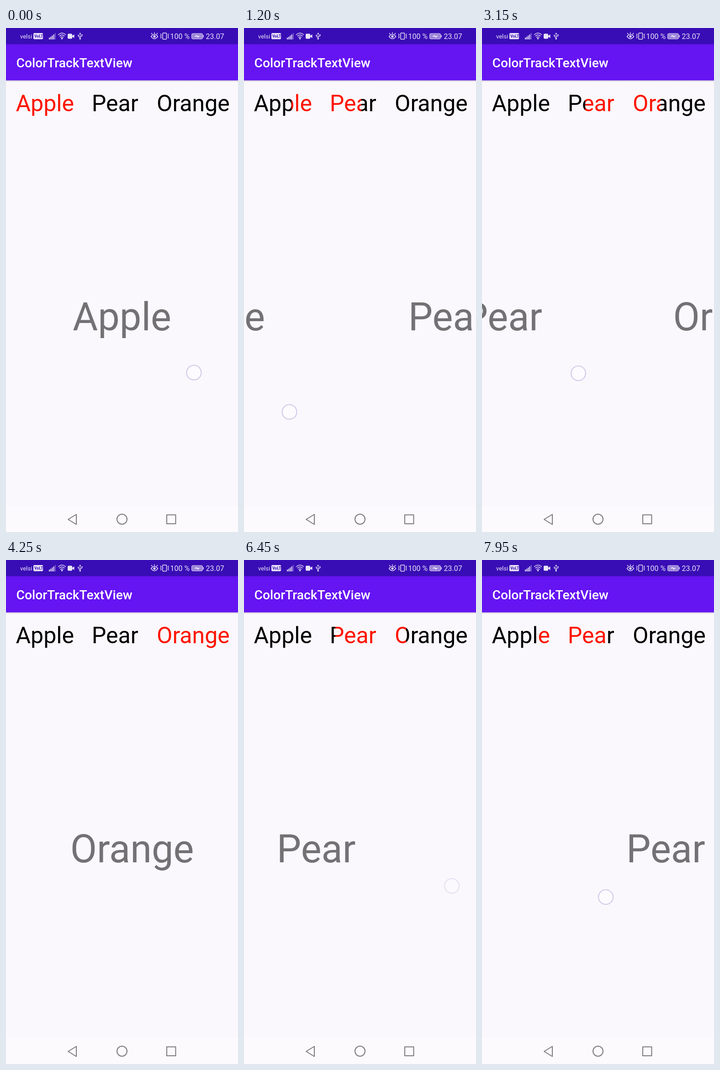
Animation of 508x1102 px, one loop 8 s. Source, as an HTML page:

```html
<!DOCTYPE html>
<html lang="en">
<head>
<meta charset="utf-8">
<title>ColorTrackTextView</title>
<style>
  html, body { margin: 0; width: 100%; height: 100%; overflow: hidden; background: #faf8fc; }
  svg { display: block; width: 508px; height: 1102px; font-family: Roboto, sans-serif; }
  .line { fill: none; stroke-linecap: round; stroke-linejoin: round; }
</style>
</head>
<body>
<svg viewBox="0 0 508 1102">
  <defs>
    <linearGradient id="shadow" x2="0" y2="1">
      <stop stop-color="#000" stop-opacity=".2"/>
      <stop offset="1" stop-color="#000" stop-opacity="0"/>
    </linearGradient>
  </defs>
  <rect width="508" height="1102" fill="#faf8fc"/>
  <rect y="1045" width="508" height="57" fill="#fcfafd"/>
  <rect y="114" width="508" height="4" fill="url(#shadow)"/>
  <rect y="35" width="508" height="79.5" fill="#6514f2"/>
  <rect width="508" height="35.5" fill="#390db5"/>
  <text x="22.5" y="85.5" font-size="28.2" font-weight="500" fill="#fff">ColorTrackTextView</text>

  <g fill="#e9e4f8">
    <text x="31" y="22.5" font-size="13">velsi</text>
    <rect x="60" y="11" width="21" height="13.5" rx="2"/>
    <text x="62" y="21.3" font-size="8.5" font-weight="700" fill="#390db5">VoLTE</text>
    <path d="M94 21h2v4h-2zM97.2 19h2v6h-2zM100.4 16.500h2v8.500h-2zM103.600 14h2v11h-2z"/>
    <path d="M107 11h1.500v14h-1.500z" opacity=".5"/>
    <rect x="135" y="12.500" width="10" height="11" rx="2"/>
    <path d="M145 17l4.500-3v8l-4.500-3z"/>
    <circle cx="122.500" cy="23" r="1.800"/>
    <circle cx="162.300" cy="23.500" r="1.700"/>
    <path d="M160.300 13l2-3 2 3z"/>
    <circle cx="158.500" cy="16" r="1.300"/>
    <path d="M165 14h2.500v2.500h-2.500z"/>
    <circle cx="325" cy="18.500" r="2.600"/>
    <text x="359.500" y="23.500" font-size="16">100 %</text>
    <text x="437.500" y="23.500" font-size="16">23.07</text>
    <rect x="406.500" y="12" width="24" height="12" rx="2.500" fill="#9c85da" stroke="#d5cbef"/>
    <path d="M431.500 15.500h1.500v5h-1.500z"/>
    <path d="M412 18.500l6-3v2h7l-6 3.500v-2.500z" fill="#fff"/>
  </g>
  <g class="line" stroke="#e9e4f8" stroke-width="1.500">
    <path d="M114.500 14.500q8-7 16 0M117 17.500q5.500-4.500 11 0M119.500 20.500q3-2.500 6 0"/>
    <path d="M162.300 12v11M162.300 21l-3.800-2.500v-2M162.300 20l3.800-2v-2" stroke-width="1.200"/>
    <path d="M317.500 18.500q7.500-9 15 0q-7.500 10-15 0zM325 12v-2M320 13.500l-1.500-2M330 13.500l1.500-2"/>
    <rect x="343" y="11" width="8.500" height="13.500" rx="1"/>
    <path d="M338.500 13l1.500 2-1.500 2.500 1.500 2.500-1.500 2M356 13l-1.500 2 1.500 2.500-1.500 2.500 1.500 2" stroke-width="1.300"/>
  </g>

  <g class="line" stroke="#7b797c" stroke-width="2">
    <path d="M136 1074.500L154 1063.500V1085.500z"/>
    <circle cx="254" cy="1074" r="11"/>
    <rect x="352" y="1064.500" width="19.500" height="19.500"/>
  </g>

  <g id="tabs" font-size="50"></g>
  <g id="pages" font-size="84.700" fill="#737174" text-anchor="middle"></g>
  <circle id="touch" r="16" fill="#fdfbfe" stroke="#d0cce9" stroke-width="2.200"/>
</svg>

<script>
const LOOP = 8000, STEP = 50, WIDTH = 508;
const SETTLE = 600, FADE = 130, TAB_LAG = 16;
const WORDS = ['Apple', 'Pear', 'Orange'];
const TAB_EDGES = [0, 169, 311, 511];
const TAB_TEXT_X = [21.5, 187.8, 330];

// Each drag: touch keys [time, x, y, page position], then the page the pager settles on.
const DRAGS = [
  { end: 1, keys: [[0, 411.5, 753.5, 0], [50, 411.5, 753.5, 0], [900, 150, 823, .515],
                   [1200, 99.5, 839.5, .622], [1350, 92, 842, .637]] },
  { end: 2, keys: [[2200, 440, 700, 1], [2290, 418, 705, 1], [3150, 211, 755, 1.41],
                   [3850, 90, 787, 1.65], [4050, 78, 790, 1.67]] },
  { end: 1, keys: [[4950, 95, 800, 2], [5070, 117, 795, 2], [5400, 180, 779.5, 1.88],
                   [5750, 280, 755, 1.69], [6385, 455, 712.5, 1.335]] },
  { end: 0, keys: [[7100, 97, 778, 1], [7190, 119, 772, 1], [7900, 263, 739, .722],
                   [8000, 279, 735, .694]] }
];

const svgNode = (parent, name, attrs, text = '') => {
  const node = document.createElementNS('http://www.w3.org/2000/svg', name);
  for (const key in attrs) node.setAttribute(key, attrs[key]);
  node.textContent = text;
  return parent.appendChild(node);
};
const byId = id => document.getElementById(id);
const touch = byId('touch');

const pages = WORDS.map(word => svgNode(byId('pages'), 'text', { y: 661 }, word));

const tabStops = WORDS.map((word, i) => {
  const gradient = svgNode(byId('tabs'), 'linearGradient', {
    id: 'tint' + i, gradientUnits: 'userSpaceOnUse', x1: TAB_EDGES[i], x2: TAB_EDGES[i + 1]
  });
  const stops = ['#000', '#ff1400', '#ff1400', '#000']
    .map(color => svgNode(gradient, 'stop', { 'stop-color': color }));
  svgNode(byId('tabs'), 'text', { x: TAB_TEXT_X[i], y: 181.5, fill: `url(#tint${i})` }, word);
  return stops;
});

function interpolate(keys, time) {
  const next = keys.findIndex(key => key[0] > time);
  if (next < 0) return keys[keys.length - 1];
  const a = keys[Math.max(0, next - 1)], b = keys[next];
  const u = Math.max(0, (time - a[0]) / (b[0] - a[0]));
  return a.map((value, i) => value + (b[i] - value) * u);
}

function stateAt(time) {
  const drag = DRAGS.filter(d => d.keys[0][0] <= time).pop() || DRAGS[0];
  const [, x, y, held] = interpolate(drag.keys, time);
  const since = Math.max(0, time - drag.keys[drag.keys.length - 1][0]);
  const remaining = (1 - Math.min(1, since / SETTLE)) ** 5;
  return {
    x, y,
    opacity: Math.max(0, 1 - since / FADE),
    position: drag.end + (held - drag.end) * remaining
  };
}

// Red part of a tab as fractions of its width.
function redRange(distance) {
  if (Math.abs(distance) >= 1) return [0, 0];
  return distance >= 0 ? [distance, 1] : [0, 1 + distance];
}

function draw(time) {
  const { x, y, opacity, position } = stateAt(time);
  const tabPosition = stateAt(time - TAB_LAG).position;
  pages.forEach((page, i) => page.setAttribute('x', WIDTH * (i + .5 - position)));
  tabStops.forEach((stops, i) => {
    const [from, to] = redRange(tabPosition - i);
    [from, from, to, to].forEach((offset, k) => stops[k].setAttribute('offset', offset));
  });
  touch.setAttribute('cx', x);
  touch.setAttribute('cy', y);
  touch.setAttribute('opacity', opacity);
}

function frame() {
  const time = performance.now() % LOOP;
  draw(Math.floor(time / STEP) * STEP);
  requestAnimationFrame(frame);
}
frame();
</script>
</body>
</html>
```
